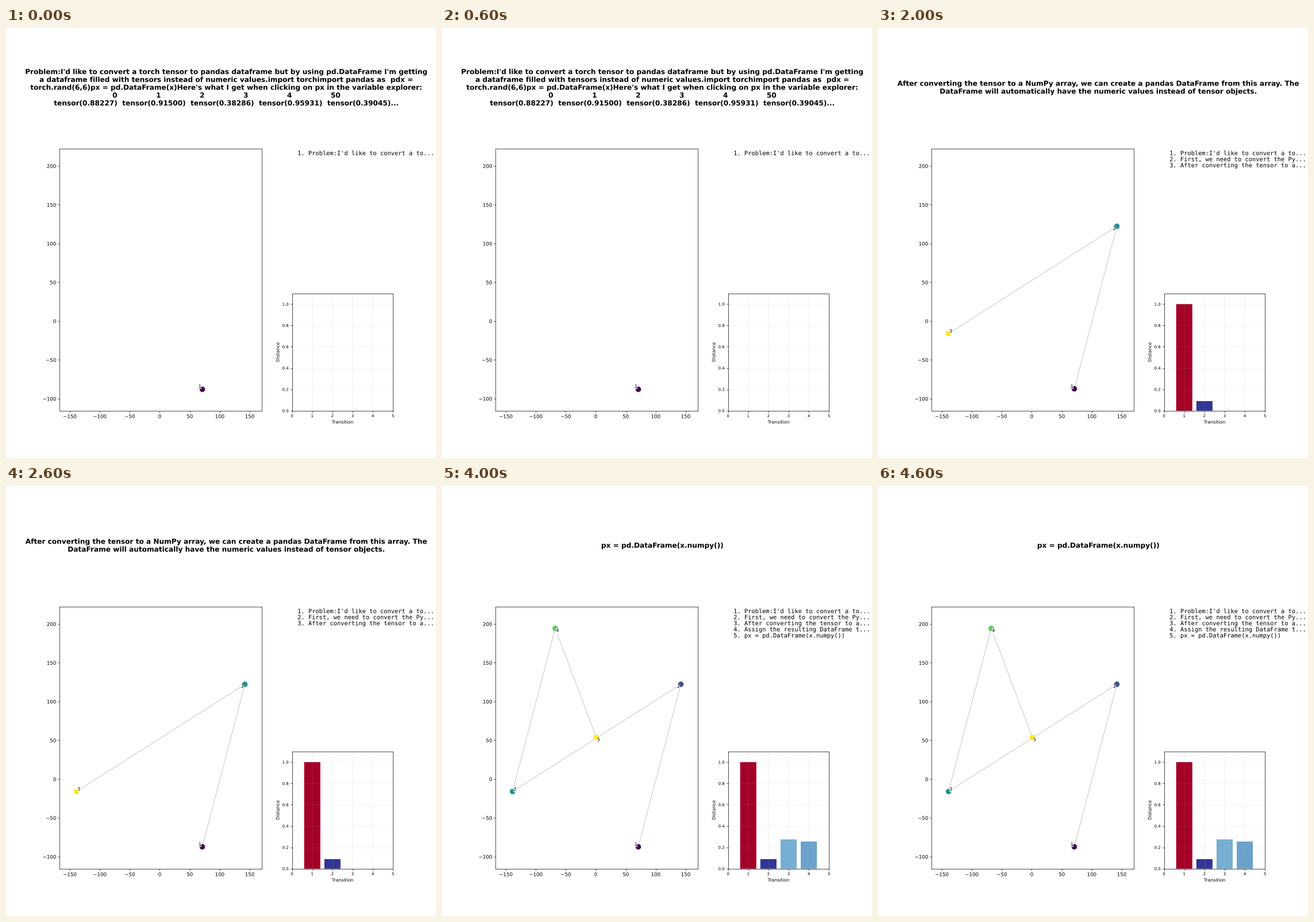
Recreate the animation shown at these times as a matplotlib script. Size 748 by 748 pixels, loop 5 s.

```python
import matplotlib.pyplot as plt
import numpy as np
from matplotlib.animation import ArtistAnimation
from matplotlib.patheffects import Normal
from matplotlib.text import Text

SIZE = 748
plt.rcParams.update({"font.family": "DejaVu Sans", "text.hinting": "no_hinting"})

gap = " " * 16
STEPS = [
    "Problem:I'd like to convert a torch tensor to pandas dataframe but by "
    "using pd.DataFrame I'm getting\n"
    "a dataframe filled with tensors instead of numeric values."
    "import torchimport pandas as  pdx =\n"
    "torch.rand(6,6)px = pd.DataFrame(x)Here's what I get when clicking on "
    "px in the variable explorer:\n"
    + gap.join(["0", "1", "2", "3", "4", "50"]) + "\n"
    "tensor(0.88227)  tensor(0.91500)  tensor(0.38286)  tensor(0.95931)  "
    "tensor(0.39045)...",
    "First, we need to convert the PyTorch tensor to a NumPy array. "
    "This can be done using the .numpy()\n"
    "method of the tensor. This method converts the tensor to a NumPy array "
    "which can then be easily\n"
    "converted to a pandas DataFrame.",
    "After converting the tensor to a NumPy array, we can create a pandas "
    "DataFrame from this array. The\n"
    "DataFrame will automatically have the numeric values instead of tensor "
    "objects.",
    "Assign the resulting DataFrame to the variable px to complete the solution.",
    "px = pd.DataFrame(x.numpy())",
]
POINTS = np.array([(70.9, -87.3), (141.9, 122.2), (-138.8, -16.0),
                   (-67.6, 194.3), (1.0, 53.7)])
LABEL_DIRS = [(-1, 1), (-1, -1), (1, 1), (1, -1), (1, -1)]
DISTANCES = np.array([1.0, 0.09, 0.275, 0.255])


def pixel_axes(left, top, right, bottom):
    return fig.add_axes([left / SIZE, 1 - bottom / SIZE,
                         (right - left) / SIZE, (bottom - top) / SIZE])


def pixel_text(x, y, text, **style):
    return fig.text(x / SIZE, 1 - y / SIZE, text, **style)


def shorten(text, limit=32):
    return text if len(text) <= limit else text[:limit] + "..."


def draw_path(count):
    pts = POINTS[:count]
    artists = map_ax.plot(*pts.T, color="gray", alpha=0.5, lw=1, zorder=2)
    artists.append(map_ax.scatter(*pts.T, s=100, c=np.linspace(0, 1, count),
                                  cmap="viridis", vmin=0, vmax=1, zorder=3))
    for i, (point, (dx, dy)) in enumerate(zip(pts, LABEL_DIRS), 1):
        artists.append(map_ax.annotate(
            str(i), point, xytext=(4.6 * dx, 4.6 * dy),
            textcoords="offset points", ha="center", va="center",
            fontsize=9, zorder=4,
            bbox=dict(boxstyle="square,pad=0.05", fc="white", ec="none", alpha=0.7)))
    return artists


def draw_bars(count):
    if count == 0:
        return []
    values = DISTANCES[:count]
    spread = np.ptp(values)
    shade = (values - values.min()) / spread if spread else np.ones(count)
    return list(bar_ax.bar(np.arange(1, count + 1), values, width=0.8,
                           color=plt.cm.RdYlBu_r(shade), snap=False))


def draw_texts(count):
    title = pixel_text(383.4, 104.1, STEPS[count - 1], ha="center", va="center",
                       fontsize=14, fontweight="bold", linespacing=1.216)
    lines = [f"{i}. {shorten(step)}" for i, step in enumerate(STEPS[:count], 1)]
    listing = pixel_text(507.1, 213.6, "\n".join(lines), ha="left", va="top",
                         fontsize=12, family="DejaVu Sans Mono", linespacing=1.104)
    return [title, listing]


fig = plt.figure(figsize=(12, 12), dpi=SIZE / 12, facecolor="white")

map_ax = pixel_axes(93.4, 209.6, 444.8, 665.7)
map_ax.set(xlim=(-166.9, 170.0), ylim=(-115.5, 222.5),
           xticks=range(-150, 151, 50), yticks=range(-100, 201, 50))

bar_ax = pixel_axes(497.6, 461.7, 673.2, 665.7)
bar_ax.set(xlim=(0, 5), ylim=(0, 1.1),
           xticks=range(6), yticks=np.arange(6) / 5)
bar_ax.set_xlabel("Transition", fontsize=9)
bar_ax.set_ylabel("Distance", fontsize=9)
bar_ax.tick_params(labelsize=8)
bar_ax.grid(True, linestyle="--", alpha=0.3)

frames = [draw_path(n) + draw_bars(n - 1) + draw_texts(n)
          for n in range(1, len(STEPS) + 1)]

# Outlined text keeps its fractional pixel position.
for text in fig.findobj(Text):
    text.set_path_effects([Normal()])

anim = ArtistAnimation(fig, frames, interval=1000, repeat=True, repeat_delay=0)
plt.show()
```
